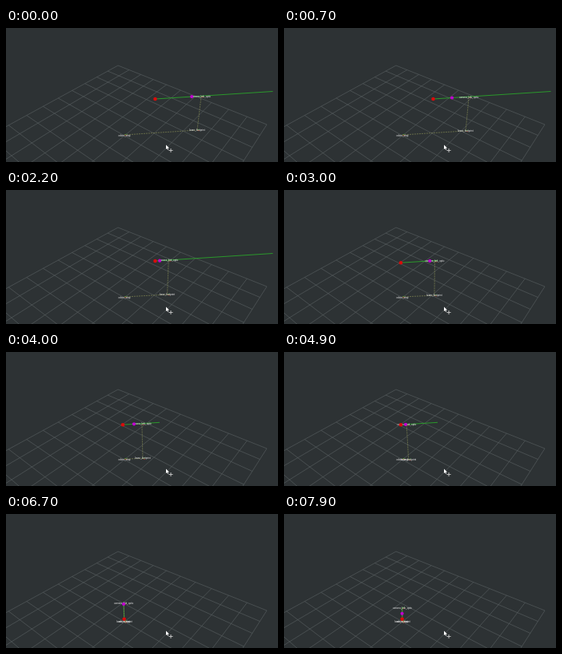
These frames come from a looping animation (340x168 px, 8 s). An HTML page with a canvas:

```html
<!DOCTYPE html>
<html>
<head>
<meta charset="utf-8">
<style>
html, body { margin: 0; overflow: hidden; background: #2d3234; }
canvas { display: block; }
</style>
</head>
<body>
<canvas id="stage" width="340" height="168"></canvas>
<script>
const c = document.getElementById('stage').getContext('2d');
const LOOP = 8, STEP = 0.1; // seconds
const ORIGIN = [148, 134];
const OLIVE = '#7e8552', GRID = '#5c6264';

// Homogeneous ground plane: far, right and left corners
const corners = [{ x: 140, y: 47, w: 1.45 }, { x: 326, y: 121, w: 1.051 }, { x: -49, y: 150.5, w: 0.949 }];

function ground(u, v) {
  const k = [1 - u - v, u, v].map((f, i) => f * corners[i].w);
  const sum = key => corners.reduce((s, p, i) => s + k[i] * (key ? p[key] : 1), 0);
  return [sum('x') / sum(), sum('y') / sum()];
}

// Each new path runs from the robot to a target; the goal closes in exponentially
const plans = [
  { time: -1.23, from: [333.5, 79.5], to: [186.5, 89] },
  { time: 2.75, from: [192, 88.3], to: [146, 91.2] },
  { time: 5.1, from: [145, 100], to: [147.7, 131.7] },
  { time: 6.55, from: [147, 110], to: [147.7, 131.7] },
  { time: 7.1, from: [147.5, 117], to: [147.7, 131.7] }
];
const DECAY = 0.95;

const mix = (a, b, f) => a.map((v, i) => v + (b[i] - v) * f);
const clamp = f => Math.min(1, Math.max(0, f));

// The camera frame drives along the diagonal, then sinks with an ease-out
function framePos(t) {
  const drive = mix([244, 86], [144, 92], clamp(t / 5.4));
  const sink = clamp((t - 5.4) / 2.5);
  return mix(drive, [148, 117.7], 1 - (1 - sink) ** 2);
}

const basePos = t => mix([239, 128], [148, 135.4], clamp(t / 5.35));

function line(a, b, color, width = 1, dash = []) {
  c.strokeStyle = color;
  c.lineWidth = width;
  c.setLineDash(dash);
  c.beginPath();
  c.moveTo(...a);
  c.lineTo(...b);
  c.stroke();
}

function dot([x, y], r, color) {
  c.fillStyle = color;
  c.beginPath();
  c.arc(x, y, r, 0, 2 * Math.PI);
  c.fill();
}

function label(text, [x, y]) {
  c.font = '3px "Liberation Sans", Arial, sans-serif';
  c.textAlign = 'center';
  c.textBaseline = 'middle';
  c.fillStyle = '#f0f0f0';
  c.fillText(text, x, y);
}

function axes([x, y]) {
  line([x, y], [x + 3, y + 1], '#b8402c', 0.7);
  line([x, y], [x + 3, y - 1], '#45983a', 0.7);
}

function cursor() {
  c.fillStyle = '#fff';
  c.fill(new Path2D('M200 146.5V152L201.3 151 202.2 153 203 152.6 202.2 150.7 204 150.5Z'));
  line([203.5, 153.5], [208.5, 153.5], '#ccc', 0.9);
  line([206, 151], [206, 156], '#ccc', 0.9);
}

function draw(t) {
  c.fillStyle = '#2d3234';
  c.fillRect(0, 0, 340, 168);
  for (let i = 0; i <= 10; i++) {
    const s = i / 10;
    line(ground(s, 0), ground(s, 1), GRID, 0.6);
    line(ground(0, s), ground(1, s), GRID, 0.6);
  }

  const frame = framePos(t), base = basePos(t);
  const plan = plans.filter(p => p.time <= t).pop();
  const goal = mix(plan.to, plan.from, Math.exp(-DECAY * (t - plan.time)));

  line(plan.from, plan.to, '#2ba32b', 0.9);
  line(ORIGIN, base, OLIVE, 0.7, [2, 1]);
  line(frame, base, OLIVE, 0.7, [2, 1]);
  [frame, base, ORIGIN].forEach(axes);
  label('camera_link_optic', frame);
  label('base_footprint', base);
  label('odom_map', [148, 135.5]);
  dot(plan.to, 2.3, '#d80c0c');
  dot(goal, 2.1, '#c000d0');
  cursor();
}

function tick(now) {
  draw(Math.floor(now / 1000 % LOOP / STEP) * STEP);
  requestAnimationFrame(tick);
}
tick(0);
</script>
</body>
</html>
```
